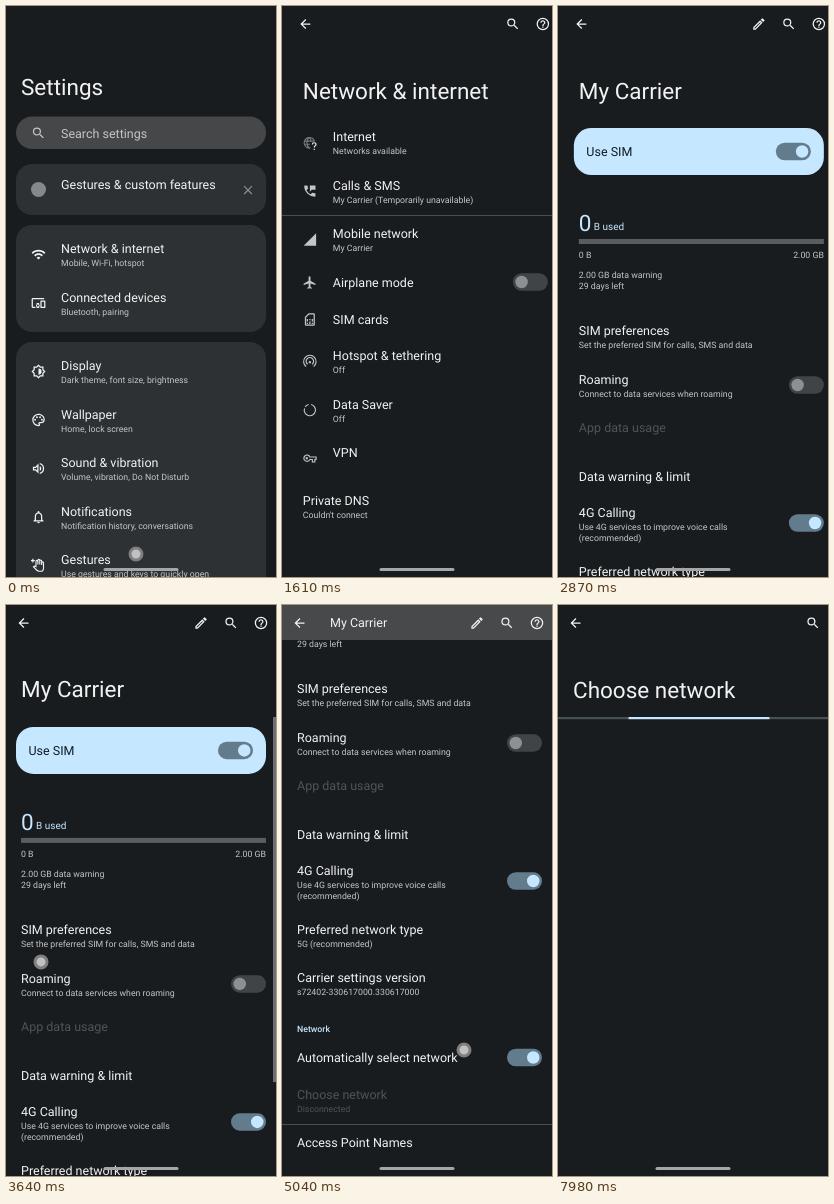
These frames come from a looping animation (270 by 571 pixels, 8 s). An HTML page:

```html
<!DOCTYPE html>
<html lang="en">
<head>
<meta charset="utf-8">
<title>Network settings</title>
<style>
html, body { margin: 0; width: 100%; height: 100%; overflow: hidden; background: #191c1e; }
svg { display: block; width: 270px; height: 571px; font-family: Roboto, sans-serif; text-rendering: geometricPrecision; }
</style>
</head>
<body>
<svg id="stage" viewBox="0 0 270 571"></svg>
<script>
const BG = '#191c1e', CARD = '#2d3133', INK = '#f1f2f3', SOFT = '#c3c6c8',
      DIM = '#505456', BLUE = '#c5e7ff';
const LOOP = 8000, SCROLL = 241, TALL = 112, SHORT = 35;

// Icons on a 24-unit grid
const icons = {
  search: 'M15.5 14h-.79l-.28-.27A6.47 6.47 0 0 0 16 9.5 6.5 6.5 0 1 0 9.5 16c1.61 0 3.09-.59 4.23-1.57l.27.28v.79l5 4.99L20.49 19zm-6 0a4.5 4.5 0 1 1 0-9 4.5 4.5 0 0 1 0 9z',
  back: 'M20 11H7.83l5.59-5.59L12 4l-8 8 8 8 1.41-1.41L7.83 13H20z',
  help: 'M11 18h2v-2h-2zM12 2a10 10 0 1 0 0 20 10 10 0 0 0 0-20zm0 18a8 8 0 1 1 0-16 8 8 0 0 1 0 16zm0-14c-2.21 0-4 1.79-4 4h2c0-1.1.9-2 2-2s2 .9 2 2c0 2-3 1.75-3 5h2c0-2.25 3-2.5 3-5 0-2.21-1.79-4-4-4z',
  edit: 'M14.06 9.02l.92.92L5.92 19H5v-.92zM17.66 3a1 1 0 0 0-.7.29l-1.83 1.83 3.75 3.75 1.83-1.83a1 1 0 0 0 0-1.41l-2.34-2.34a1 1 0 0 0-.71-.29zm-3.6 3.19L3 17.25V21h3.75L17.81 9.94z',
  close: 'M19 6.4 17.6 5 12 10.6 6.4 5 5 6.4 10.6 12 5 17.6 6.4 19 12 13.4 17.6 19 19 17.6 13.4 12z',
  wifi: 'M1 9l2 2c4.97-4.97 13.03-4.97 18 0l2-2C16.93 2.93 7.08 2.93 1 9zm8 8 3 3 3-3a4.24 4.24 0 0 0-6 0zm-4-4 2 2a7.07 7.07 0 0 1 10 0l2-2C15.14 9.14 8.87 9.14 5 13z',
  devices: 'M3 6h18V4H3a2 2 0 0 0-2 2v12a2 2 0 0 0 2 2h4v-2H3zm10 6H9v1.8a3 3 0 0 0 0 4.4V20h4v-1.8a3 3 0 0 0 0-4.4zm-2 5.5a1.5 1.5 0 0 1 0-3 1.5 1.5 0 0 1 0 3zM22 8h-6a1 1 0 0 0-1 1v10a1 1 0 0 0 1 1h6a1 1 0 0 0 1-1V9a1 1 0 0 0-1-1zm-1 10h-4v-8h4z',
  display: 'M20 8.69V4h-4.69L12 .69 8.69 4H4v4.69L.69 12 4 15.31V20h4.69L12 23.31 15.31 20H20v-4.69L23.31 12zm-2 5.79V18h-3.52L12 20.48 9.52 18H6v-3.52L3.52 12 6 9.52V6h3.52L12 3.52 14.48 6H18v3.52L20.48 12zM12 7v10a5 5 0 0 0 0-10z',
  palette: 'M12 22a10 10 0 1 1 0-20c5.51 0 10 4.04 10 9a6 6 0 0 1-6 6h-1.77a.5.5 0 0 0-.37.83c.41.47.64 1.06.64 1.67A2.5 2.5 0 0 1 12 22zm0-18a8 8 0 0 0 0 16 .5.5 0 0 0 .36-.85 2.5 2.5 0 0 1 1.87-4.15H16a4 4 0 0 0 4-4c0-3.86-3.59-7-8-7zM5 11.5a1.5 1.5 0 1 1 3 0 1.5 1.5 0 0 1-3 0zM8 7.5a1.5 1.5 0 1 1 3 0 1.5 1.5 0 0 1-3 0zM13 7.5a1.5 1.5 0 1 1 3 0 1.5 1.5 0 0 1-3 0zM16 11.5a1.5 1.5 0 1 1 3 0 1.5 1.5 0 0 1-3 0z',
  sound: 'M3 9v6h4l5 5V4L7 9zm7-.17v6.34L7.83 13H5v-2h2.83zM16.5 12A4.5 4.5 0 0 0 14 7.97v8.05A4.47 4.47 0 0 0 16.5 12zM14 3.23v2.06a7 7 0 0 1 0 13.42v2.06a9 9 0 0 0 0-17.54z',
  bell: 'M12 22a2 2 0 0 0 2-2h-4a2 2 0 0 0 2 2zm6-6v-5c0-3.07-1.63-5.64-4.5-6.32V4a1.5 1.5 0 0 0-3 0v.68C7.64 5.36 6 7.92 6 11v5l-2 2v1h16v-1zm-2 1H8v-6c0-2.48 1.51-4.5 4-4.5s4 2.02 4 4.5z',
  call: 'M20 15.5c-1.25 0-2.45-.2-3.57-.57a1 1 0 0 0-1.02.24l-2.2 2.2a15.07 15.07 0 0 1-6.59-6.58l2.2-2.21c.28-.27.36-.66.25-1.01A11.36 11.36 0 0 1 8.5 4a1 1 0 0 0-1-1H4a1 1 0 0 0-1 1 17 17 0 0 0 17 17 1 1 0 0 0 1-1v-3.5a1 1 0 0 0-1-1zM12 3v10l3-3h6V3z',
  signal: 'M2 22h20V2z',
  plane: 'M21 16v-2l-8-5V3.5a1.5 1.5 0 0 0-3 0V9l-8 5v2l8-2.5V19l-2 1.5V22l3.5-1 3.5 1v-1.5L13 19v-5.5z',
  sim: 'M18 2h-8L4 8v12a2 2 0 0 0 2 2h12a2 2 0 0 0 2-2V4a2 2 0 0 0-2-2zm0 18H6V8.83L10.83 4H18zM7 17h2v2H7zM15 17h2v2h-2zM7 11h2v4H7zM11 15h2v4h-2zM11 11h2v2h-2zM15 11h2v4h-2z'
};
const lines = {
  hand: 'M8 14V6a1.5 1.5 0 0 1 3 0v5V4.5a1.5 1.5 0 0 1 3 0V11V5.5a1.5 1.5 0 0 1 3 0V12V8.5a1.5 1.5 0 0 1 3 0V17a5 5 0 0 1-5 5h-2c-2 0-3-1-4-2l-5-5c1-1.5 3-1 4-.5zM0 5h6M3 2v6',
  globe: 'M13 20A8.5 8.5 0 1 1 19.5 9M2.5 9h17M2.5 14H12M11 3c-5 5-5 12 0 17M11 3c2 2 3 4 3.5 7',
  ask: 'M16 14.5c0-4 6-4 6 0 0 2-3 2-3 4.5M19 21v2',
  hotspot: 'M6 20a10 10 0 1 1 12 0M8.5 16.5a6 6 0 1 1 7 0M11 13a1 1 0 1 1 2 0 1 1 0 1 1-2 0',
  saver: 'M14 3.3a9 9 0 1 1-10.5 6M4.5 7A9 9 0 0 1 10 3.3',
  key: 'M12 9.5h10v4h-2v4h-4v-4h-4a5 5 0 1 1 0-4zM6 11.5a1 1 0 1 1 2 0 1 1 0 1 1-2 0'
};

const place = (x, y) => `transform="translate(${x - 7.5} ${y - 7.5}) scale(.625)"`;
const icon = (name, x, y, fill = INK) => name in icons
  ? `<path d="${icons[name]}" ${place(x, y)} fill="${fill}" fill-rule="evenodd"/>`
  : `<path d="${lines[name]}" ${place(x, y)} fill="none" stroke="${fill}" stroke-width="1.8"/>`;
const text = (s, x, y, size = 12.5, fill = INK, more = '') =>
  `<text x="${x}" y="${y}" font-size="${size}" fill="${fill}" ${more}>${s.replace(/&/g, '&amp;')}</text>`;
const small = (s, x, y, fill = SOFT, more = '') => text(s, x, y + 3.1, 8.75, fill, more);
const row = (x, y, title, sub, fill = INK, subFill = SOFT) =>
  text(title, x, y + 4.3, 12.5, fill) + (sub ? small(sub, x, y + 14, subFill) : '');
const box = (x, y, w, h, fill, r = 0, more = '') =>
  `<rect x="${x}" y="${y}" width="${w}" height="${h}" rx="${r}" fill="${fill}" ${more}/>`;
const toggle = (x, y, on, id = '') =>
  `<g id="${id}">${box(x, y - 8.75, 35, 17.5, on ? '#627b8d' : '#414446', 8.75)}` +
  `<circle cx="${x + (on ? 26.25 : 8.75)}" cy="${y}" r="6.25" fill="${on ? BLUE : '#8d9092'}"/></g>`;
const ripple = (id, y, shape) =>
  `<clipPath id="${id}Clip"><path d="${shape}"/></clipPath>` +
  `<circle id="${id}" cy="${y}" r="0" fill="url(#glow)" clip-path="url(#${id}Clip)"/>`;
const page = (id, body) => `<g id="${id}">${box(-30, 0, 330, 571, BG)}${body}</g>`;
const tools = names => icon('back', 17.5, 18) +
  names.map((n, i) => icon(n, 255 - 30 * i, 18)).join('');

const homeRows = [
  ['wifi', 243, 'Network & internet', 'Mobile, Wi-Fi, hotspot'],
  ['devices', 291.5, 'Connected devices', 'Bluetooth, pairing'],
  ['display', 360, 'Display', 'Dark theme, font size, brightness'],
  ['palette', 408.5, 'Wallpaper', 'Home, lock screen'],
  ['sound', 457, 'Sound & vibration', 'Volume, vibration, Do Not Disturb'],
  ['bell', 505.5, 'Notifications', 'Notification history, conversations'],
  ['hand', 553.5, 'Gestures', 'Use gestures and keys to quickly open']
];
const home = page('home',
  text('Settings', 15, 88.7, 22.5) +
  box(10, 110.5, 250, 32.5, '#454748', 16.25) + icon('search', 32.5, 127, SOFT) +
  text('Search settings', 55, 131.5, 12.5, SOFT) +
  box(10, 158, 250, 51, CARD, 16) + box(10, 219, 250, 107, CARD, 16) + box(10, 336, 250, 260, CARD, 16) +
  ripple('homeTap', 246, 'M10 272V235a16 16 0 0 1 16-16h218a16 16 0 0 1 16 16v37z') +
  '<circle cx="32.5" cy="183.5" r="7.5" fill="#85898b"/>' +
  row(55, 178.5, 'Gestures & custom features') + icon('close', 242, 184, '#8b8f91') +
  homeRows.map(([i, y, a, b]) => icon(i, 32.5, y + 5.5) + row(55, y, a, b)).join(''));

const netRows = [
  ['call', 179.5, 'Calls & SMS', 'My Carrier (Temporarily unavailable)'],
  ['signal', 228, 'Mobile network', 'My Carrier'],
  ['plane', 276.5, 'Airplane mode'],
  ['sim', 313.5, 'SIM cards'],
  ['hotspot', 350, 'Hotspot & tethering', 'Off'],
  ['saver', 398.5, 'Data Saver', 'Off'],
  ['key', 447, 'VPN']
];
const net = page('net',
  tools(['help', 'search']) + text('Network & internet', 15, 92.5, 22.5) +
  box(-30, 209, 330, 1, '#4b4e50') + ripple('netTap', 234, 'M-30 210H300V258H-30z') +
  icon('globe', 22, 137, '#777b7d') + icon('ask', 22, 137) + row(45, 131, 'Internet', 'Networks available') +
  netRows.map(([i, y, a, b]) =>
    icon(i, 22, y + (b || i === 'key' ? 5.5 : 0), SOFT) + row(45, y, a, b)).join('') +
  toggle(225, 276, false) + row(15, 495, 'Private DNS', "Couldn't connect"));

const carrier = page('carrier',
  '<g id="list">' +
  box(10, 122, 250, 47, BLUE, 17.5) + text('Use SIM', 22.5, 150.3, 12.5, '#101c26') +
  toggle(212, 145.5, true) +
  text('0', 15, 224.7, 22.5, BLUE) + text('B used', 30, 224.4, 10, BLUE) +
  box(15, 233, 245, 5, '#5a5d5f') + small('0 B', 15, 249) + small('2.00 GB', 260, 249, SOFT, 'text-anchor="end"') +
  small('2.00 GB data warning', 15, 268.5) + small('29 days left', 15, 280) +
  ripple('autoTap', 693, 'M-30 675H300V712H-30z') +
  row(15, 325, 'SIM preferences', 'Set the preferred SIM for calls, SMS and data') +
  row(15, 373.5, 'Roaming', 'Connect to data services when roaming') + toggle(225, 379, false) +
  row(15, 422, 'App data usage', '', DIM) +
  row(15, 470.5, 'Data warning & limit') +
  row(15, 507, '4G Calling', 'Use 4G services to improve voice calls') +
  small('(recommended)', 15, 531.5) + toggle(225, 517, true) +
  row(15, 566, 'Preferred network type', '5G (recommended)') +
  row(15, 614, 'Carrier settings version', 's72402-330617000.330617000') +
  small('Network', 15, 665, BLUE, 'font-weight="500"') +
  row(15, 694, 'Automatically select network') + toggle(225, 693.5, true, 'autoOn') + toggle(225, 693.5, false, 'autoOff') +
  row(15, 731, 'Choose network', 'Disconnected', DIM, DIM) +
  box(-30, 760, 330, 1, '#4b4e50') + row(15, 779, 'Access Point Names') + '</g>' +
  box(-30, 0, 330, TALL, BG, 0, 'id="head"') + box(-30, 0, 330, SHORT, '#47494b', 0, 'id="scrim"') +
  tools(['help', 'search', 'edit']) +
  `<g id="name">${text('My Carrier', 0, 0, 22.5)}</g>` + box(267, 112, 3, 365, '#6d7072', 0, 'id="thumb"'));

const choose = page('choose',
  tools(['search']) + text('Choose network', 15, 92.5, 22.5) +
  box(-30, 112, 330, 2.2, '#465155') +
  box(0, 112, 0, 2.2, BLUE, 0, 'id="barA"') + box(0, 112, 0, 2.2, BLUE, 0, 'id="barB"'));

stage.innerHTML =
  `<radialGradient id="glow">${[[0, .3], [.6, .25], [1, .08]].map(([o, a]) =>
    `<stop offset="${o}" stop-color="#fff" stop-opacity="${a}"/>`).join('')}</radialGradient>` +
  home + net + carrier + choose + box(97.5, 562, 75, 3, '#a4a6a7', 1.5) +
  '<circle id="dot" r="6" fill="#cbcbcb" stroke="#858585" stroke-width="3"/>';

const el = id => document.getElementById(id);
const set = (id, attrs) => { for (const k in attrs) el(id).setAttribute(k, attrs[k]); };
const clamp = (v, hi = 1) => Math.min(hi, Math.max(0, v));
const mix = (a, b, p) => a + (b - a) * p;

function ease(x, [x1, y1, x2, y2]) {
  const at = (a, b, s) => 3 * (1 - s) * (1 - s) * s * a + 3 * (1 - s) * s * s * b + s * s * s;
  let lo = 0, hi = 1;
  for (let i = 0; i < 24; i++) {
    const mid = (lo + hi) / 2;
    if (at(x1, x2, mid) < x) lo = mid; else hi = mid;
  }
  return at(y1, y2, lo);
}

// Keys are [time, value, curve to the next key]
function follow(keys, p) {
  const i = Math.max(0, keys.findIndex(k => k[0] > p) - 1);
  const [t0, v0, curve] = keys[i], [t1, v1] = keys[i + 1];
  return mix(v0, v1, curve ? ease((p - t0) / (t1 - t0), curve) : (p - t0) / (t1 - t0));
}

const bars = {
  barA: {
    mid: [[0, -.9517], [.2, -.9517, [.5, 0, .702, .496]], [.5915, -.115, [.302, .381, .55, .956]], [1, 1.0544]],
    size: [[0, .08], [.3665, .08, [.335, .125, .786, 1]], [.6915, .6615, [.06, .11, .6, 1]], [1, .08]]
  },
  barB: {
    mid: [[0, -.0489, [.15, 0, .515, .41]], [.25, .3276, [.31, .284, .8, .734]], [.4835, .795, [.4, .627, .6, .902]], [1, 1.5539]],
    size: [[0, .08, [.205, .057, .577, .454]], [.1915, .35, [.152, .196, .648, 1.004]], [.4415, .56, [.258, 0, .212, 1.38]], [1, .08]]
  }
};

const pages = [['home', -1e4], ['net', 1440], ['carrier', 2700], ['choose', 5240]];
// Touches: x, y, shown from, fading from, gone
const taps = [[130, 548, 0, 0, 210], [60, 246, 970, 980, 1240], [30, 240, 2160, 2170, 2500],
              [35, 357, 3560, 3900, 4100], [182, 445, 5030, 5050, 5360]];

function spread(id, t, x, start, most = 1) {
  const p = clamp((t - start) / 420, most);
  set(id, { cx: mix(x, 135, p), r: 160 * p });
}

function draw(t) {
  const slide = start => ease(clamp((t - start) / 450), [.2, 0, 0, 1]);
  pages.forEach(([id, start], i) => {
    const next = pages[i + 1] ? pages[i + 1][1] : Infinity;
    set(id, {
      transform: `translate(${27 * (1 - slide(start) - slide(next))} 0)`,
      opacity: clamp((t - start - 35) / 83)
    });
  });

  spread('homeTap', t, 60, 925, .8);
  spread('netTap', t, 30, 2140);
  spread('autoTap', t, 182, 5050);

  const s = SCROLL * ease(clamp((t - 3640) / 760), [.35, .1, .3, 1]);
  const fold = clamp(s / (TALL - SHORT));
  set('list', { transform: `translate(0 ${-s})` });
  set('head', { height: mix(TALL, SHORT, fold) });
  set('scrim', { opacity: clamp((fold - .7) / .3) });
  set('name', { transform: `translate(${mix(15, 48, fold)} ${mix(92.5, 22.3, fold)}) scale(${mix(1, 12.5 / 22.5, fold)})` });
  set('thumb', { y: mix(112, 206, s / SCROLL), opacity: t >= 3570 && t < 4410 ? 1 : 0 });

  const off = clamp((t - 5100) / 150);
  set('autoOn', { opacity: 1 - off });
  set('autoOff', { opacity: off });
  for (const id of ['autoOn', 'autoOff']) el(id).lastChild.setAttribute('cx', mix(251.25, 233.75, off));

  const p = (Math.max(0, t - 5272) / 2000) % 1;
  for (const id in bars) {
    const mid = follow(bars[id].mid, p), size = follow(bars[id].size, p);
    set(id, { x: 270 * (mid - size / 2), width: 270 * size });
  }

  const tap = taps.find(k => t >= k[2] && t < k[4]);
  set('dot', tap
    ? { cx: tap[0], cy: tap[1] - (tap[0] === 35 ? s : 0), opacity: .95 * (1 - clamp((t - tap[3]) / (tap[4] - tap[3]))) }
    : { opacity: 0 });
}

const begin = performance.now();
function tick() {
  draw((performance.now() - begin) % LOOP);
  requestAnimationFrame(tick);
}
tick();
</script>
</body>
</html>
```
